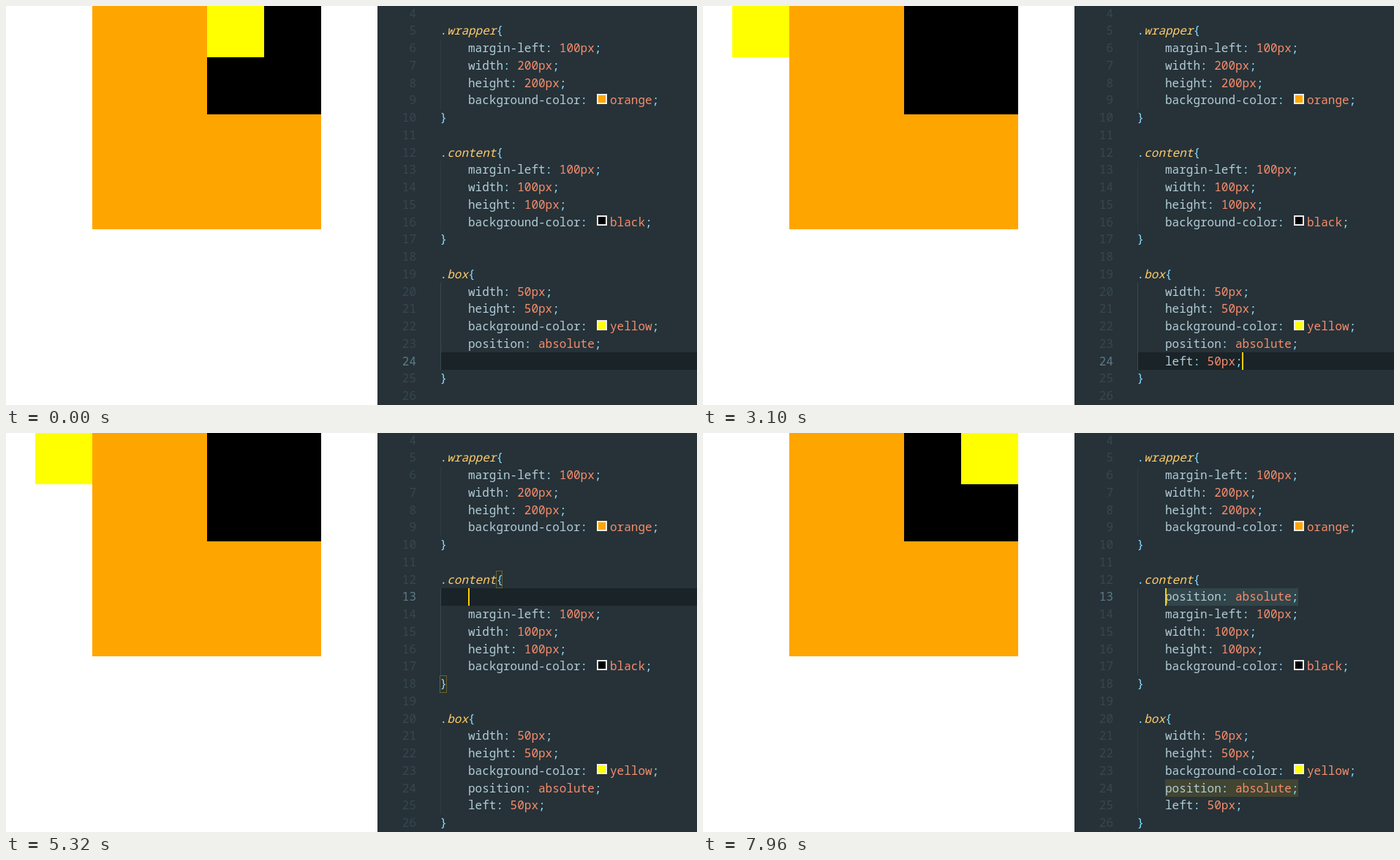
These frames come from a looping animation (945x545 px, 8 s). An HTML page:

```html
<!DOCTYPE html>
<html lang="en">
<head>
<meta charset="utf-8">
<title>CSS editor demo</title>
<style>
  html, body { margin: 0; width: 100%; height: 100%; overflow: hidden; background: #fff; }
  svg { display: block; }
  text { font: 16px "Noto Sans Mono", "DejaVu Sans Mono", monospace; white-space: pre; }
  .num { fill: #37474f; text-anchor: end; }
  .num.on { fill: #607a86; }
  .sel { fill: #ffcb6b; font-style: italic; }
  .prop { fill: #b2ccd6; }
  .val { fill: #f78c6c; }
  .punc { fill: #89ddff; }
</style>
</head>
<body>
<svg id="stage" width="945" height="545" viewBox="0 0 945 545"></svg>
<script>
const LOOP = 8000, LEFT = 593.6, CHAR = 9.6, LINE = 23.75;
const svg = document.querySelector('svg');

// Caret visible: start, end, x, line
const carets = [
  [290, 920, 593, 24], [1380, 1850, 593, 24],
  [2000, 2480, 737, 24], [3010, 3480, 737, 24], [3710, 3920, 737, 24], [4400, 4630, 737, 24],
  [4940, 5320, 679, 12], [5320, 5800, 632, 13],
  [6100, 6640, 814, 13], [7040, 7500, 814, 13], [7960, LOOP, 632, 13]
];

const rowTop = n => 188 + (n - 12) * LINE;
const rect = (x, y, w, h, fill, extra = '') =>
  `<rect x="${x}" y="${y}" width="${w}" height="${h}" fill="${fill}" ${extra}/>`;
const band = (n, x, w, fill) => {
  const y = Math.round(rowTop(n));
  return rect(x, y, w, Math.round(rowTop(n + 1)) - y, fill);
};
const text = (x, n, body, cls = '') =>
  `<text x="${x}" y="${Math.round(rowTop(n) + 17.7)}" class="${cls}">${body}</text>`;
const span = (cls, s) => `<tspan class="${cls}">${s}</tspan>`;
const bracket = (n, x, w) =>
  rect(x + .5, Math.round(rowTop(n)) + .5, w - 1, 23, 'none', 'stroke="#ffcc0050"');

function codeLine(n, line) {
  if (line === '}') return text(LEFT, n, line, 'punc');
  if (line[0] === '.')
    return text(LEFT, n, span('punc', '.') + span('sel', line.slice(1, -1)) + span('punc', '{'));
  const [prop, value] = line.split(': ');
  const x = LEFT + 4 * CHAR;
  const name = span('prop', prop) + span('punc', ': ');
  const rest = span('val', value) + span('punc', ';');
  if (prop !== 'background-color') return text(x, n, name + rest);
  const y = Math.floor(rowTop(n) + 3.5);
  return text(x, n, name) + rect(808, y, 14, 14, '#eee') + rect(810, y + 2, 10, 10, value) +
    text(826, n, rest);
}

function render(t) {
  const inserted = t >= 5320, selected = t >= 7960;
  const active = t < 4630 ? 24 : inserted ? 13 : 12;
  const blocks = [
    ['.wrapper{', 'margin-left: 100px', 'width: 200px', 'height: 200px', 'background-color: orange'],
    ['.content{', 'margin-left: 100px', 'width: 100px', 'height: 100px', 'background-color: black'],
    ['.box{', 'width: 50px', 'height: 50px', 'background-color: yellow', 'position: absolute',
      t < 2000 ? '' : 'left: 50px']
  ];
  if (inserted) blocks[1].splice(1, 0, t < 6100 ? '' : 'position: absolute');

  let out = rect(118, 0, 313, 305, 'orange') + rect(275, 0, 156, 148, '#000') +
    rect(t < 3100 ? 275 : t < 7190 ? 40 : 353, 0, 78, 70, '#ff0') +
    rect(508, 0, 437, 545, '#263238');

  if (selected) out += band(13, 632, 182, '#31454a') + band(24, 632, 182, '#414531');
  else out += band(active, 594, 351, '#1a2327');

  for (let n = 4; n <= 26; n++) out += text(561, n, n, n === active ? 'num on' : 'num');

  let n = 5;
  for (const block of blocks) {
    const first = n + 1, end = n + block.length;
    const y = Math.round(rowTop(first));
    const lit = active >= first && active < end;
    out += rect(594, y, 1, Math.round(rowTop(end)) - y, lit ? '#37474f' : '#2e3b42');
    block.forEach((line, i) => { if (line) out += codeLine(n + i, line); });
    out += codeLine(end, '}');
    n = end + 2;
  }

  if (t >= 4630 && t < 5570) out += bracket(12, 670, 9) + bracket(inserted ? 18 : 17, 593, 10);
  const caret = carets.find(c => t >= c[0] && t < c[1]);
  if (caret) out += band(caret[3], caret[2], 2, '#fc0');
  return out;
}

let shown = '';
function tick() {
  const next = render(performance.now() % LOOP);
  if (next !== shown) svg.innerHTML = shown = next;
  requestAnimationFrame(tick);
}
tick();
</script>
</body>
</html>
```
